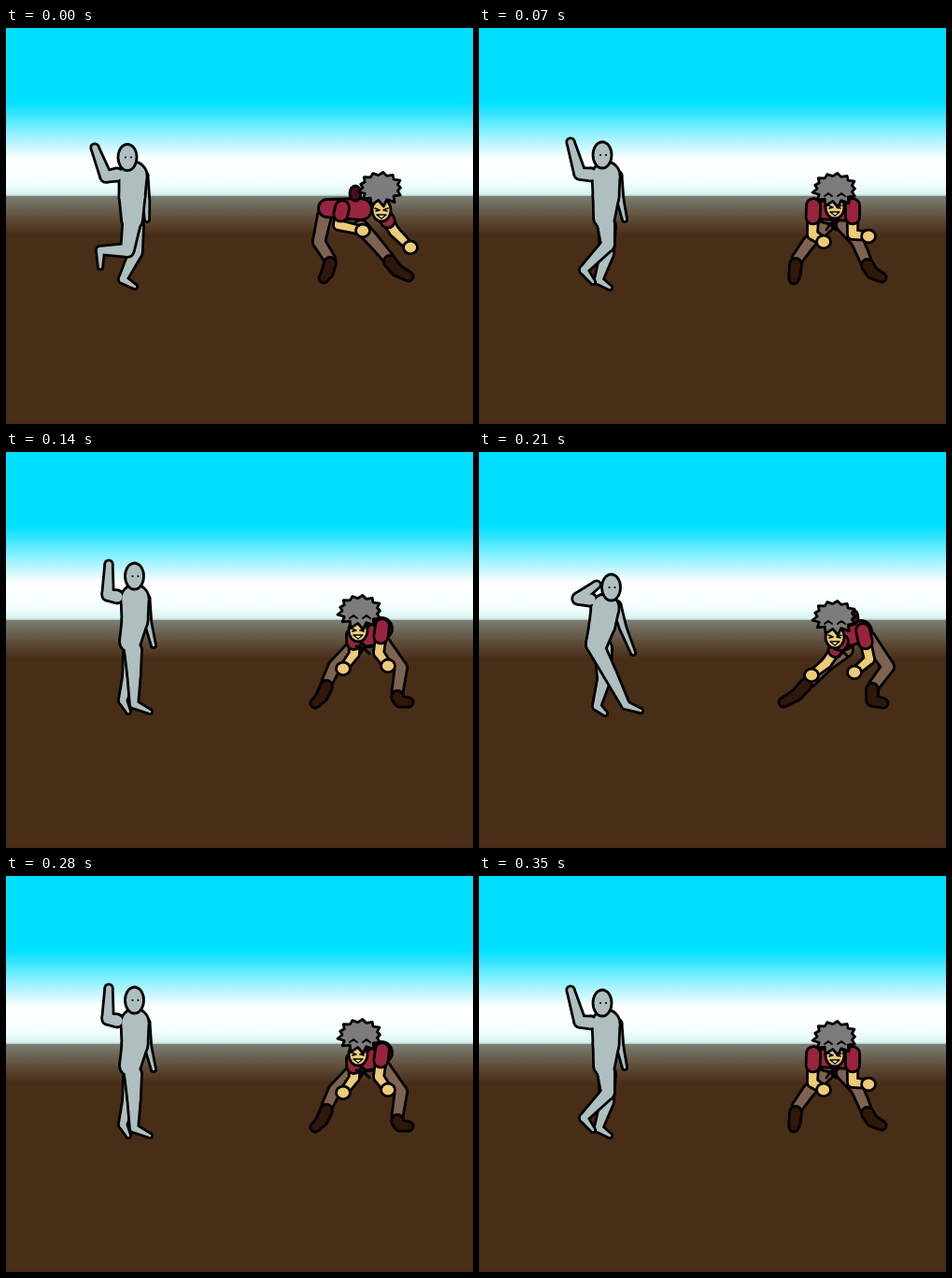
An HTML page with a canvas for the animation above (0.42 s loop, 500 px wide and 424 px high).

```html
<!DOCTYPE html>
<html lang="en">
<head>
<meta charset="utf-8">
<title>Face-off</title>
<style>
html, body { margin: 0; width: 100%; height: 100%; overflow: hidden; }
canvas { display: block; }
</style>
</head>
<body>
<canvas width="500" height="424"></canvas>
<script>
const ctx = document.querySelector('canvas').getContext('2d');
const BODY = '#afbfbf', HAIR = '#7c7c7c', SKIN = '#eccb79', SHIRT = '#98243d';
const COLLAR = '#4a0f1d', PANTS = '#7d6350', BOOT = '#30170a', INK = '#000';
const EDGE = 1.4;
const STEP = 70, ORDER = [0, 1, 2, 3, 2, 1];

// Radii along each kind of part, from the trunk outwards
const TRUNK = [15, 14, 11.5], RAISED = [7, 6.3, 4.2], LOW = [5, 3.8, 2.6], LEG = [9.5, 7.3, 4.6, 2.6];
const CHEST = [9.5, 11.5], SLEEVE = [7.5, 7.5], ARM = [6, 5.5, 4.5], TROUSER = [7.5, 6.7, 6], SHOE = [6.5, 6.2, 5];

// Joints of the grey walker
const walker = [
  { head: '130,138.5', trunk: '136,158 135,180 135,205', raised: '119,157 107,159 95,128',
    low: '147,158 150,185 151,205', back: '138,212 139,240 125,269 138,277', front: '134,212 130,238 101,238 101,256' },
  { head: '132,136', trunk: '136,158 136,180 134,203', raised: '120,157 108,156 98,122',
    low: '148,158 151,183 156,205', back: '137,212 137,242 128,270 140,278', front: '136,210 138,232 112,259 122,272' },
  { head: '137.5,133', trunk: '138,157 138,180 133,203', raised: '119,155 109,153 110,120',
    low: '149,157 152,183 158,207', back: '135,212 132,240 125,266 131,278', front: '136,212 137,238 137,270 154,278' },
  { head: '141.5,145', trunk: '135,167 132,185 126,205', raised: '119,158 106,157 126,142',
    low: '147,164 154,188 165,215', back: '133,210 134,243 126,272 135,280', front: '124,206 140,237 157,271 173,277' }
];

// Joints of the crouching fighter; the knot shows only when he faces us
const fighter = [
  { face: '402,195', hair: '401,171', collar: '374,177', chest: '344,193 380,194',
    arms: ['404,199 416,218 433,235', '360,192 356,211 382,217'],
    legs: ['380,213 392,226 409,246', '341,201 335,229 347,248'],
    boots: ['411,250 418,259 431,266', '347,252 344,262 340,268'] },
  { face: '381,192', hair: '381,172', collar: '384,176', chest: '365,195 396,195', knot: '376,210',
    arms: ['358,190 357,221 369,229', '400,190 400,221 417,223'],
    legs: ['372,211 353,230 341,247', '390,211 405,228 414,249'],
    boots: ['339,253 338,264 337,269', '416,254 421,262 431,267'] },
  { face: '377,191', hair: '379,170', collar: '392,173', chest: '389,199 402,189', knot: '383,210',
    arms: ['372,196 373,216 361,232', '403,186 399,215 409,229'],
    legs: ['371,210 352,229 344,246', '404,205 423,231 419,257'],
    boots: ['343,251 338,262 331,269', '419,262 422,267 431,268'] },
  { face: '381,198', hair: '381,176', collar: '400,177', chest: '396,198 409,192', knot: '389,213',
    arms: ['388,203 372,226 356,239', '411,191 418,222 402,236'],
    legs: ['393,212 373,227 354,246', '416,198 438,230 423,250'],
    boots: ['350,249 340,260 326,268', '421,254 421,266 433,269'] }
];

const points = text => text.split(' ').map(p => p.split(',').map(Number));
const noise = i => Math.abs(Math.sin(i * 12.9898) * 43758.5453) % 1;

ctx.lineJoin = ctx.lineCap = 'round';

function disc(x, y, rx, ry = rx) {
  ctx.beginPath();
  ctx.ellipse(x, y, rx, ry, 0, 0, 2 * Math.PI);
  ctx.fill();
}

function oval(color, x, y, rx, ry = rx) {
  for (const [fill, grow] of [[INK, EDGE], [color, -EDGE]]) {
    ctx.fillStyle = fill;
    disc(x, y, rx + grow, ry + grow);
  }
}

function path(p) {
  ctx.beginPath();
  p.forEach(q => ctx.lineTo(...q));
}

function line(width, ...p) {
  path(p);
  ctx.lineWidth = width;
  ctx.strokeStyle = INK;
  ctx.stroke();
}

// Tapered tube: a disc at each joint, a quad between neighbours
function tube(p, radii, grow) {
  p.forEach(([x, y], i) => {
    const r = radii[i] + grow;
    disc(x, y, r);
    if (!i) return;
    const [u, v] = p[i - 1], s = radii[i - 1] + grow;
    const d = Math.hypot(x - u, y - v) || 1, nx = (v - y) / d, ny = (x - u) / d;
    path([[u + nx * s, v + ny * s], [x + nx * r, y + ny * r], [x - nx * r, y - ny * r], [u - nx * s, v - ny * s]]);
    ctx.fill();
  });
}

// Parts drawn together share one outline
function parts(color, ...list) {
  for (const [fill, grow] of [[INK, EDGE], [color, -EDGE]]) {
    ctx.fillStyle = fill;
    for (const [p, radii] of list) tube(typeof p === 'string' ? points(p) : p, radii, grow);
  }
}

function drawWalker(pose) {
  parts(BODY, [pose.low, LOW], [pose.back, LEG]);
  parts(BODY, [pose.trunk, TRUNK], [pose.raised, RAISED], [pose.front, LEG]);
  const [[x, y]] = points(pose.head);
  oval(BODY, x, y, 10, 14);
  ctx.fillStyle = INK;
  for (const dx of [-2, 4]) disc(x + dx, y, 1.1);
}

function drawArm(text) {
  const p = points(text), [[x, y], [u, v], fist] = p;
  parts(SKIN, [p, ARM]);
  oval(SKIN, ...fist, 7.5, 6.8);
  parts(SHIRT, [[[x, y], [x + (u - x) * 0.4, y + (v - y) * 0.4]], SLEEVE]);
}

function drawFace(x, y) {
  oval(SKIN, x, y, 10, 12);
  for (const s of [-1, 1]) line(1.6, [x + 7 * s, y - 2], [x + 2 * s, y], [x + 6 * s, y + 1]);
  ctx.fillStyle = '#fff';
  path([[x - 5, y + 5], [x + 5, y + 5], [x, y + 9]]);
  ctx.fill();
  line(1.3, [x - 5, y + 5], [x + 5, y + 5], [x, y + 9], [x - 5, y + 5]);
}

// Ring of uneven spikes, longer towards the fringe
function drawHair(x, y) {
  const n = 26, ring = [];
  for (let i = 0; i < n; i++) {
    const a = i / n * 2 * Math.PI, low = Math.max(0, Math.sin(a));
    const k = i % 2 ? 0.9 : 1.02 + 0.12 * noise(i) + 0.25 * low;
    ring.push([x + 21 * k * Math.cos(a), y + 15 * k * Math.sin(a)]);
  }
  path(ring);
  ctx.closePath();
  ctx.fillStyle = HAIR;
  ctx.fill();
  ctx.lineWidth = 2 * EDGE;
  ctx.strokeStyle = INK;
  ctx.stroke();
}

function drawFighter(pose) {
  pose.legs.forEach((leg, i) => {
    parts(PANTS, [leg, TROUSER]);
    parts(BOOT, [pose.boots[i], SHOE]);
  });
  parts(SHIRT, [pose.chest, CHEST]);
  pose.arms.forEach(drawArm);
  oval(COLLAR, ...points(pose.collar)[0], 6, 8);
  drawFace(...points(pose.face)[0]);
  const [[x, y]] = points(pose.hair);
  drawHair(x, y);
  if (!pose.knot) return;
  for (const s of [-7, 7]) line(2, [x + s - 4, y + 8], [x + s, y + 5], [x + s + 4, y + 8]);
  const [[u, v]] = points(pose.knot);
  for (const [dx, dy] of [[-8, -2], [8, -3], [-4, 6], [6, 6]]) line(3, [u, v], [u + dx, v + dy]);
}

function gradient(top, bottom, ...stops) {
  const g = ctx.createLinearGradient(0, top, 0, bottom);
  for (const [y, color] of stops) g.addColorStop((y - top) / (bottom - top), color);
  ctx.fillStyle = g;
  ctx.fillRect(0, top, 500, bottom - top);
}

function draw(time) {
  gradient(0, 180, [0, '#00dfff'], [79, '#00dfff'], [140, '#fff'], [166, '#f3fffe'], [178, '#d9f4f3'], [180, '#a9b8b3']);
  gradient(180, 424, [180, '#7b7e74'], [205, '#5d4a36'], [222, '#482d17'], [424, '#482d17']);
  ctx.fillStyle = '#53251a';
  ctx.fillRect(0, 422, 500, 2);
  const pose = ORDER[Math.floor(time / STEP) % ORDER.length];
  drawWalker(walker[pose]);
  drawFighter(fighter[pose]);
}

const start = performance.now();

function tick() {
  draw(performance.now() - start);
  requestAnimationFrame(tick);
}

tick();
</script>
</body>
</html>
```
